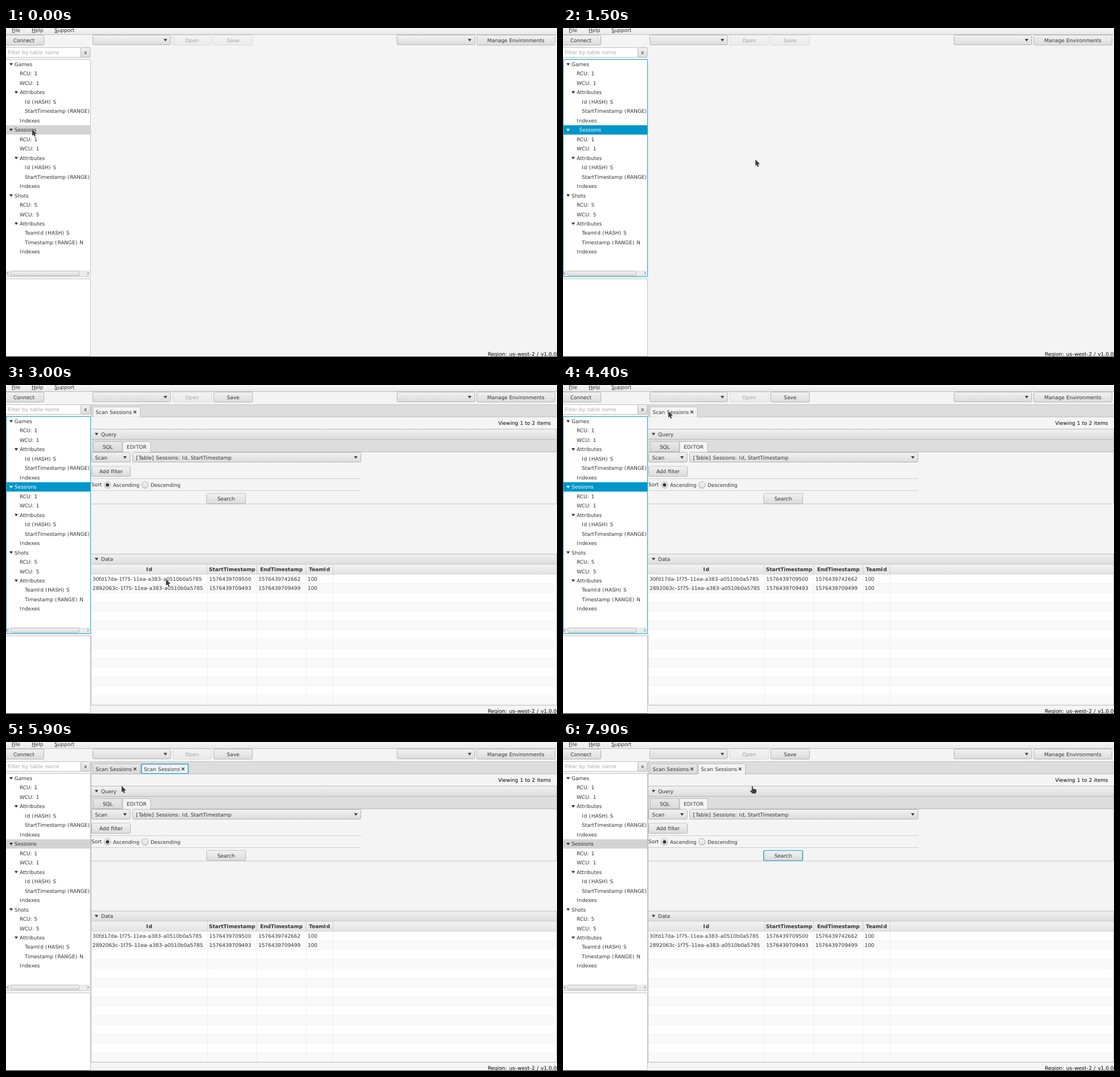
An HTML page with a canvas for the animation above (8000 ms loop, 968 by 578 pixels).

```html
<!DOCTYPE html>
<html lang="en">
<head>
<meta charset="utf-8">
<title>Table browser</title>
<style>
html, body { margin: 0; width: 968px; height: 578px; overflow: hidden; background: #f4f4f4; }
canvas { display: block; }
</style>
</head>
<body>
<canvas id="stage" width="968" height="578"></canvas>
<script>
const ctx = document.getElementById('stage').getContext('2d');
const LOOP = 8000, ROW = 16.47;
const INK = '#333', EDGE = '#b9b9b9', FOCUS = '#1ea7d2', SELECT = '#0096c9', BG = '#f4f4f4';

// Tree rows: indent, label, has arrow
const tableRows = (name, units, hash, range) => [
  [15, name, 1], [24, 'RCU: ' + units], [24, 'WCU: ' + units], [24, 'Attributes', 1],
  [33, hash], [33, range], [24, 'Indexes']
];
const tree = [
  ...tableRows('Games', 1, 'Id (HASH) S', 'StartTimestamp (RANGE) N'),
  ...tableRows('Sessions', 1, 'Id (HASH) S', 'StartTimestamp (RANGE) N'),
  ...tableRows('Shots', 5, 'TeamId (HASH) S', 'Timestamp (RANGE) N')
];
const SELECTED = 7;

// Columns: left edge, right edge, title, values
const columns = [
  [149, 354, 'Id', ['30fd17da-1f75-11ea-a383-a0510b0a5785', '2892063c-1f75-11ea-a383-a0510b0a5785']],
  [354, 440.5, 'StartTimestamp', ['1576439709500', '1576439709493']],
  [440.5, 527, 'EndTimestamp', ['1576439742662', '1576439709499']],
  [527, 574.5, 'TeamId', ['100', '100']]
];

// Pointer moves: start time, number of 100 ms steps, end position
const moves = [
  [100, 1, 45.5, 178], [800, 2, 60, 187], [1400, 2, 338, 231], [2400, 1, 255, 141],
  [2900, 2, 281, 341], [3900, 4, 171, 55], [4300, 2, 185, 46], [5300, 2, 203, 77],
  [6000, 6, 269, 45], [6800, 4, 368, 207], [7200, 2, 371, 197], [7600, 4, 333, 77.5]
];

function pointerAt(time) {
  let x = 46, y = 178;
  for (const [start, steps, toX, toY] of moves) {
    if (time < start) break;
    const p = Math.min(1, (Math.floor((time - start) / 100) + 1) / steps);
    const k = p * p * (3 - 2 * p);
    x += (toX - x) * k;
    y += (toY - y) * k;
  }
  return [x, y];
}

function rect(x, y, w, h, fill) {
  ctx.fillStyle = fill;
  ctx.fillRect(x, y, w, h);
}

function gradient(y, h, top, bottom) {
  const g = ctx.createLinearGradient(0, y, 0, y + h);
  g.addColorStop(0, top);
  g.addColorStop(1, bottom);
  return g;
}

function box(x, y, w, h, fill, stroke = EDGE, radius = 0, width = 1) {
  ctx.beginPath();
  ctx.roundRect(x, y, w, h, radius);
  ctx.fillStyle = fill;
  ctx.fill();
  ctx.strokeStyle = stroke;
  ctx.lineWidth = width;
  ctx.stroke();
}

function polygon(points, fill) {
  ctx.beginPath();
  points.forEach(([x, y]) => ctx.lineTo(x, y));
  ctx.closePath();
  ctx.fillStyle = fill;
  ctx.fill();
}

// Text centred vertically on its capitals; hair spaces loosen the punctuation
function text(label, x, midY, { color = INK, align = 'left', bold = false } = {}) {
  ctx.font = `${bold ? 'bold ' : ''}8.95px "DejaVu Sans", sans-serif`;
  ctx.textAlign = align;
  ctx.fillStyle = color;
  ctx.fillText(label.replace(/[-:()[\]/I](?!$)/g, '$&\u200a'), x, midY + 3.3);
}

const arrowDown = (x, y, color = INK) =>
  polygon([[x - 3.1, y - 2], [x + 3.1, y - 2], [x, y + 2.4]], color);

function chevron(x, y, dir) {
  ctx.beginPath();
  ctx.moveTo(x - dir * 1.5, y - 2.5);
  ctx.lineTo(x + dir * 1.5, y);
  ctx.lineTo(x - dir * 1.5, y + 2.5);
  ctx.strokeStyle = '#777';
  ctx.lineWidth = 1;
  ctx.stroke();
}

function button(label, x, y, w, h, { focus, hover, disabled } = {}) {
  ctx.globalAlpha = disabled ? 0.4 : 1;
  const fill = hover ? gradient(y, h, '#fafafa', '#e9e9e9') : gradient(y, h, '#f1f1f1', '#dcdcdc');
  box(x, y, w, h, fill, focus ? FOCUS : '#b4b4b4', 2, focus ? 1.5 : 1);
  rect(x + 1, y + 0.5, w - 2, 0.7, '#fafafa');
  text(label, x + w / 2, y + h / 2, { align: 'center' });
  ctx.globalAlpha = 1;
}

function combo(label, x, y, w) {
  button('', x, y, w, 17);
  text(label, x + 6, y + 8.7);
  arrowDown(x + w - 9, y + 8.7);
}

function tab(label, x, y, w, h, { selected, focus, closable } = {}) {
  box(x, y, w, h, selected ? BG : gradient(y, h, '#e9e9e9', '#d9d9d9'), EDGE, [2, 2, 0, 0]);
  if (selected) rect(x + 0.5, y + h - 0.5, w - 1, 1.5, BG);
  if (focus) box(x + 0.5, y + 0.5, w - 1, h - 1, BG, FOCUS, 2, 1.4);
  if (!closable) return text(label, x + w / 2, y + h / 2 + 0.3, { align: 'center' });
  text(label, x + 4.5, y + h / 2 + 0.4);
  const cx = x + w - 9.5, cy = y + h / 2 + 0.2;
  ctx.beginPath();
  for (const s of [-1, 1]) {
    ctx.moveTo(cx - 2.4, cy - 2.4 * s);
    ctx.lineTo(cx + 2.4, cy + 2.4 * s);
  }
  ctx.strokeStyle = '#444';
  ctx.lineWidth = 1.3;
  ctx.stroke();
}

function titleBar(label, y) {
  box(149.5, y, 818, 18, gradient(y, 18, '#f1f1f1', '#dddddd'));
  arrowDown(159, y + 8.7);
  text(label, 167, y + 9);
}

function popup(x, y, w, labels, active) {
  const item = 18.8;
  ctx.save();
  ctx.shadowColor = 'rgba(0,0,0,.3)';
  ctx.shadowBlur = 6;
  ctx.shadowOffsetY = 1;
  rect(x, y, w, labels.length * item + 5.5, BG);
  ctx.restore();
  labels.forEach((label, i) => {
    const top = y + 2.7 + i * item;
    if (i === active) rect(x + 0.5, top, w - 1, item, SELECT);
    text(label, x + 8, top + item / 2, { color: i === active ? '#fff' : INK });
  });
}

function toolbar(loaded) {
  rect(0, 0, 968, 11, gradient(0, 11, '#f6f6f6', '#e8e8e8'));
  rect(0, 11, 968, 1, '#c0c0c0');
  [['File', 10, 5], ['Help', 45, 7], ['Support', 85, 6]].forEach(([label, x, w]) => {
    text(label, x, 3.2);
    rect(x + 0.5, 7.6, w, 0.8, INK);
  });
  button('Connect', -3.5, 12.5, 70, 17.5);
  combo('', 152.5, 12.5, 136.5);
  button('Open', 293, 12.5, 68, 17.5, { disabled: true });
  button('Save', 365, 12.5, 68, 17.5, { disabled: !loaded });
  combo('', 687, 12.5, 136.5);
  button('Manage Environments', 827, 12.5, 137.5, 17.5);
}

function sidebar(time) {
  const focused = time >= 300 && time < 4600;
  const loading = time >= 1200 && time < 1900;
  box(-3.5, 34.5, 135, 17, '#fff', '#c0c0c0', 2);
  text('Filter by table name', 3, 43, { color: '#aaa' });
  button('x', 131.5, 34.5, 16.5, 17);

  if (focused) box(-0.5, 54.5, 150, 383, BG, '#d9eef5');
  box(focused ? 0.5 : -0.5, 55.5, focused ? 148 : 149, 381, '#fff', focused ? FOCUS : '#c4c4c4');
  ctx.save();
  ctx.beginPath();
  ctx.rect(focused ? 1 : 0, 56, focused ? 147 : 148, 380);
  ctx.clip();
  tree.forEach(([x, label, parent], i) => {
    const y = 63.7 + i * ROW, selected = i === SELECTED;
    if (selected) rect(0, y - 8.2, 148, ROW, focused ? SELECT : '#d3d3d3');
    const color = selected && focused ? '#fff' : INK;
    if (parent) arrowDown(x - 6, y, color);
    text(label, selected && loading ? 28.5 : x, y, { color });
  });
  rect(0.8, 426, 146.7, 9.7, '#ececec');
  ctx.restore();
  box(8.5, 427, 120, 8, gradient(427, 8, '#f3f3f3', '#dcdcdc'), '#b9b9b9', 2);
  chevron(3, 431, -1);
  chevron(144, 431, 1);
  box(-0.5, 440.8, 148.8, 135.7, '#fff', '#c4c4c4');
}

function radio(label, x, on) {
  box(x - 5.8, 169.7, 11.6, 11.6, gradient(169, 12, '#f5f5f5', '#dedede'), '#a8a8a8', 5.8);
  if (on) {
    ctx.beginPath();
    ctx.arc(x, 175.5, 2.9, 0, 7);
    ctx.fillStyle = INK;
    ctx.fill();
  }
  text(label, x + 9.7, 175.7);
}

function dataTable() {
  rect(150, 315.5, 817.5, 17, gradient(315, 17, '#f3f3f3', '#e3e3e3'));
  for (let i = 0; i < 14; i++) {
    const y = 332.3 + i * 16.44;
    rect(150, y, 817.5, 16.44, i % 2 ? '#f9f9f9' : '#fff');
    rect(150, y + 16, 817.5, 0.6, '#eeeeee');
  }
  columns.forEach(([left, right, title, values]) => {
    rect(right - 0.3, 315.5, 0.8, 17, '#c8c8c8');
    rect(right - 0.3, 332.3, 0.8, 230, '#ebebeb');
    text(title, (left + right) / 2, 324, { align: 'center', bold: true });
    values.forEach((value, i) => text(value, left + 3, 340.7 + i * ROW));
  });
  rect(150, 332, 817.5, 0.7, '#cccccc');
  rect(149, 562, 819, 1, EDGE);
}

function page(time, [px, py]) {
  const cloned = time >= 5900, searchFocus = time >= 7500;
  rect(149, 34.5, 819, 21.5, '#dddddd');
  rect(149, 34, 819, 1, '#c4c4c4');
  rect(149, 55.5, 819, 1, EDGE);
  const first = { closable: true, selected: !cloned, focus: time >= 4600 && !cloned };
  tab('Scan Sessions', 153, 38.3, 83, 17.7, first);
  if (cloned) tab('Scan Sessions', 237.7, 38.3, 82.8, 17.7, { closable: true, selected: true, focus: !searchFocus });
  text('Viewing 1 to 2 items', 957.5, 66.3, { align: 'right', color: '#000' });

  titleBar('Query', 77.5);
  rect(150, 96, 817.5, 22, '#dddddd');
  rect(150, 117, 817.5, 1, EDGE);
  tab('SQL', 153.5, 99.3, 50.5, 17.7);
  tab('EDITOR', 205, 99.3, 49, 17.7, { selected: true });
  combo('Scan', 150.5, 118.5, 67.5);
  combo('[Table] Sessions: Id, StartTimestamp', 222.5, 118.5, 401);
  button('Add filter', 150.5, 143, 68, 17.5);
  rect(150, 164, 474, 0.8, '#c6c6c6');
  text('Sort', 150, 174.8);
  radio('Ascending', 178.3, true);
  radio('Descending', 244.2, false);
  rect(150, 185, 474, 0.8, '#c6c6c6');
  const hover = px > 352 && px < 421 && py > 190 && py < 208;
  button('Search', 352.5, 190.8, 68.5, 17.6, { focus: searchFocus, hover });
  rect(150, 208.6, 817.5, 0.8, EDGE);

  titleBar('Data', 297);
  dataTable();
  rect(149, 34, 1, 529, EDGE);
  rect(967, 77, 1, 132, EDGE);
  rect(967, 297, 1, 266, EDGE);
}

function pointer(x, y, hand) {
  ctx.save();
  ctx.translate(x, y);
  ctx.strokeStyle = 'rgba(255,255,255,.8)';
  ctx.lineWidth = 1;
  ctx.lineJoin = 'round';
  const shape = new Path2D(hand
    ? 'M-1.4 1Q-.3-.8.7 1V5Q4 4.3 7 6.5V10L5.5 13H-.7L-4.4 8.6Q-4.2 6.8-1.4 8Z'
    : 'M0 0V11.2L2.5 9.2L4.2 13L6.2 12.1L4.6 8.4L8 8Z');
  ctx.stroke(shape);
  ctx.fillStyle = '#3f3f3f';
  ctx.fill(shape);
  ctx.restore();
}

function draw() {
  const time = performance.now() % LOOP;
  const tip = pointerAt(time), [x, y] = tip;
  const loaded = time >= 1900;
  ctx.textRendering = 'geometricPrecision';
  ctx.wordSpacing = '0.3px';
  rect(0, 0, 968, 578, BG);
  toolbar(loaded);
  if (loaded) page(time, tip);
  sidebar(time);
  text('Region: us-west-2 / v1.0.0', 967.5, 572.3, { align: 'right', color: '#000' });
  rect(0, 577, 968, 1, '#3a3a3a');
  if (time >= 600 && time < 1200)
    popup(46, 178, 93, ['Scan table', 'Create table', 'Edit table', 'Delete table'], time >= 800 ? 0 : -1);
  if (time >= 5000 && time < 5700)
    popup(187, 46, 52, ['Close', 'Clone'], time >= 5400 ? 1 : time >= 5300 ? 0 : -1);
  const overTitle = (y > 77.2 && y < 95) || (y > 297 && y < 315);
  pointer(x, y, loaded && overTitle);
  requestAnimationFrame(draw);
}
draw();
</script>
</body>
</html>
```
